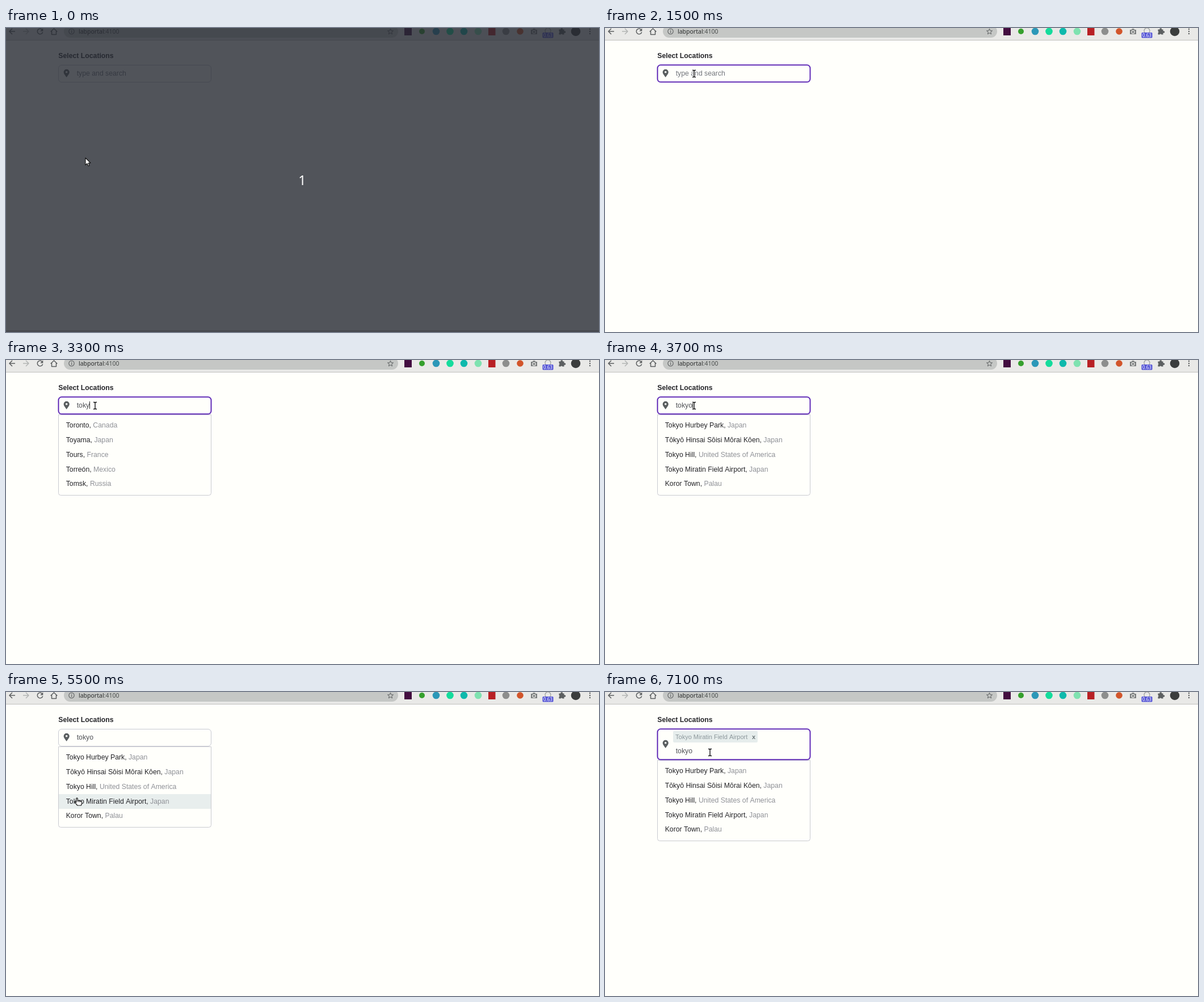
Write an HTML page with a canvas that moves like this. It is 1045 by 536 pixels and loops after 8 s.

```html
<!DOCTYPE html>
<html lang="en">
<head>
<meta charset="utf-8">
<title>Location picker</title>
<style>
html, body { margin: 0; width: 100%; height: 100%; overflow: hidden; background: #fffffb; }
canvas { display: block; width: 1045px; height: 536px; }
</style>
</head>
<body>
<canvas id="stage" width="1045" height="536"></canvas>
<script>
const ctx = document.getElementById('stage').getContext('2d');
const LOOP = 8000;
const HOVER_LEAD = 115;
const PAGE = '#fffffb';
const ICON = '#5c5f60';
const SANS = '"Liberation Sans", Arial, sans-serif';
const UI = '"Noto Sans", "Open Sans", sans-serif';
const BODY = '12.25px ' + SANS;
const ROW = 25.8;

const park = ['Tokyo Hurbey Park', 'Japan'];
const garden = ['Tōkyō Hinsai Sōisi Mōrai Kōen', 'Japan'];
const hill = ['Tokyo Hill', 'United States of America'];
const airport = ['Tokyo Miratin Field Airport', 'Japan'];
const town = ['Koror Town', 'Palau'];

// Each entry holds from its start time until the next one.
const typing = [[0, ''], [2400, 't'], [2500, 'to'], [2700, 'tok'], [3300, 'toky'], [3500, 'tokyo']];
const results = [
  [0, null],
  [2400, [['Tianjin', 'China'], ['Alicante', 'Spain'], ['Tekirdağ', 'Turkey'], ['Rabat', 'Morocco'], ['Shenyang', 'China']]],
  [2700, [['Toronto', 'Canada'], ['Toyama', 'Japan'], ['Tours', 'France'], ['Torreón', 'Mexico'], ['Tomsk', 'Russia']]],
  [3400, [hill, park, garden, airport, town]],
  [3700, [park, garden, hill, airport, town]]
];
const carets = [[0, false], [1000, true], [1500, false], [2100, true], [4200, false], [4900, true], [5400, false]];

// Pointer moves: start, end, from, to.
const moves = [
  [600, 1200, [140, 229], [157, 80.5]],
  [5100, 5500, [155, 78], [125, 187]],
  [5600, 5700, [125, 187], [119, 186]],
  [6500, 7100, [119, 186], [185, 106.5]]
];

const at = (track, t) => track.filter(([start]) => start <= t).pop()[1];
const smooth = p => p * p * (3 - 2 * p);

function pointer(t) {
  const [start, end, a, b] = moves.filter(m => m[0] <= t).pop() || moves[0];
  const p = smooth(Math.max(0, Math.min(1, (t - start) / (end - start))));
  return a.map((v, i) => v + (b[i] - v) * p);
}

function text(s, x, y, font, color, align = 'left') {
  ctx.font = font;
  ctx.fillStyle = color;
  ctx.textAlign = align;
  ctx.fillText(s, x, y);
  return ctx.measureText(s).width;
}

function box(x, y, w, h, r, fill, stroke, width = 1) {
  ctx.beginPath();
  ctx.roundRect(x, y, w, h, r);
  paint(fill, stroke, width);
}

function circle(x, y, r, fill, stroke, width = 1) {
  ctx.beginPath();
  ctx.arc(x, y, r, 0, Math.PI * 2);
  paint(fill, stroke, width);
}

function shape(d, x, y, fill, stroke, width = 1) {
  ctx.save();
  ctx.translate(x, y);
  const path = new Path2D(d);
  ctx.lineJoin = 'round';
  if (fill) { ctx.fillStyle = fill; ctx.fill(path, 'evenodd'); }
  if (stroke) { ctx.strokeStyle = stroke; ctx.lineWidth = width; ctx.stroke(path); }
  ctx.restore();
}

function paint(fill, stroke, width) {
  if (fill) { ctx.fillStyle = fill; ctx.fill(); }
  if (stroke) { ctx.strokeStyle = stroke; ctx.lineWidth = width; ctx.stroke(); }
}

function drawToolbar() {
  ctx.fillStyle = '#e9e9e7';
  ctx.fillRect(0, 0, 1045, 21);
  ctx.fillStyle = '#bfc0be';
  ctx.fillRect(0, 21, 1045, 1);
  box(102, -5, 589, 22, 11, '#c5c7c5');

  shape('M5 0H-4.5M0 -5L-5 0L0 5', 11, 6, null, ICON, 1.5);
  shape('M-5 0H4.5M0 -5L5 0L0 5', 35, 6, null, '#b3b5b4', 1.5);
  shape('M4.2 -2.4A4.8 4.8 0 1 0 4.7 1.2', 60, 6, null, ICON, 1.5);
  shape('M5.3 -5.5V-.5H.3Z', 60, 6, ICON);
  shape('M-5.8 .5L0 -5L5.8 .5M-4 -1V5.5H4V-1', 84.5, 6, null, ICON, 1.5);
  circle(115.5, 6, 4.7, null, ICON, 1.1);
  ctx.fillStyle = ICON;
  ctx.fillRect(115, 5.3, 1.2, 3.4);
  ctx.fillRect(115, 3.2, 1.2, 1.2);
  const w = text('labportal', 128, 10, '10.5px ' + UI, '#2b2d2d');
  text(':4100', 128 + w, 10, '10.5px ' + UI, '#4c504f');
  shape('M0 -5L1.4 -1.6L5 -1.4L2.2 .9L3.1 4.5L0 2.5L-3.1 4.5L-2.2 .9L-5 -1.4L-1.4 -1.6Z', 677.5, 6.3, null, ICON);

  box(702, 0, 13, 13, 0, '#430d40');
  circle(733, 6, 5, '#35a02c');
  circle(758, 6, 6.3, '#2c98b8');
  circle(782.5, 6, 6.3, '#14dc9c');
  circle(807, 6, 6.3, '#0eb9ac');
  circle(832, 6, 6.3, '#7fe2b0');
  box(850, 0, 12.5, 13, 0, '#b82024');
  circle(881, 6, 6.3, '#8d8e8d');
  circle(906, 6, 5.8, '#d2552a');

  shape('M-5.5 -3H-2.7L-1.6 -4.7H1.6L2.7 -3H5.5V5H-5.5Z', 930.5, 6, '#7b7e7e');
  circle(930.5, 7, 2.6, '#7b7e7e', '#e9e9e7', 1.2);
  circle(955, 5, 5, null, '#9a9c9b', 1.2);
  box(945.5, 8, 19, 9.5, 1.5, '#5454d6');
  text('0.63', 955, 15.7, '8px ' + UI, '#fff', 'center');
  shape('M-5 -3H-2A1.8 1.8 0 1 1 1.5 -3H4V0A1.8 1.8 0 1 1 4 3V6H1A1.7 1.7 0 0 0 -2 6H-5V3A1.7 1.7 0 0 0 -5 0Z', 979.5, 5.5, ICON);
  circle(1004, 6, 8.3, '#3b3d3d');
  for (const y of [2, 6, 10]) circle(1029, y, 1.2, ICON);
}

function drawResults(rows, top, active) {
  box(92.5, top + .5, 269, 142, [0, 0, 4, 4], PAGE, '#c9cad0');
  rows.forEach(([place, country], i) => {
    const y = top + 6.3 + i * ROW;
    if (i === active) {
      ctx.fillStyle = '#e8eeed';
      ctx.fillRect(93, Math.round(y), 268, 26);
    }
    const w = text(place + ', ', 105.7, y + 16.8, BODY, '#242428');
    text(country, 105.7 + w, y + 16.8, BODY, '#8f9197');
  });
}

function drawInput(typed, height, tagged, hovered, caret) {
  const mid = 65 + height / 2;
  const baseline = tagged ? 108 : 84;
  if (hovered) {
    box(92.5, 65.3, 269, height, 5.5, PAGE, 'rgba(110, 70, 210, .3)', 3);
    box(92.5, 65.3, 269, height, 5.5, null, '#571cae', 1.5);
  } else {
    box(92.5, 65.5, 269, height, 5.5, PAGE, '#c8cad3');
  }

  shape('M0 7.2C-1.5 4.8 -5.1 1.1 -5.1 -2A5.1 5.1 0 0 1 5.1 -2C5.1 1.1 1.5 4.8 0 7.2ZM1.8 -2A1.8 1.8 0 1 0 -1.8 -2A1.8 1.8 0 1 0 1.8 -2Z', 106.7, mid - .2, '#5a5e60');

  if (tagged) {
    box(120, 68.5, 149, 20.5, 2.5, '#e6edec');
    text(airport[0], 124, 82.6, '11.03px ' + SANS, '#8c979b');
    text('x', 262, 82.6, 'bold 11.03px ' + SANS, '#6d7779', 'center');
  }
  const w = text(typed || 'type and search', 124.7, baseline, BODY, typed ? '#505257' : '#73767d');
  if (caret) {
    ctx.fillStyle = '#222';
    ctx.fillRect(Math.floor(125 + (typed ? w : 0)), typed ? 73 : 74, 1, 13);
  }
}

function drawArrow(x, y) {
  shape('M0 0V12.5L3 9.8L5 14.3L7 13.4L5.1 9H9Z', x, y, '#fff', '#111', 1.1);
}

function drawBeam(x, y) {
  const d = 'M-3 -6H-1L0 -5L1 -6H3M0 -5V5M-3 6H-1L0 5L1 6H3';
  shape(d, x, y, null, '#fff', 3);
  shape(d, x, y, null, '#111', 1.4);
}

function drawHand(x, y) {
  shape('M-1.2 7.5V.8Q0 -1 1.3 .8V4.6Q2.6 3.6 3.6 5Q5 4.1 6 5.6Q8.3 5 8.6 7V10L7.3 13H.8L-3.3 8.2Q-3 6 -1.2 7.5Z', x, y, '#fff', '#111', 1.2);
  shape('M1.3 4.6V7M3.6 5V7.3M6 5.6V7.5', x, y, null, '#111', .8);
}

function drawCountdown() {
  ctx.fillStyle = 'rgba(38, 42, 50, .8)';
  ctx.fillRect(0, 0, 1045, 536);
  ctx.fillStyle = 'rgba(40, 40, 46, .25)';
  ctx.fillRect(0, 533, 1045, 3);
  text('1', 522, 277, '23.5px ' + UI, '#fff', 'center');
}

function draw(now) {
  const t = Math.floor(now % LOOP / 100) * 100;
  const typed = at(typing, t);
  const rows = at(results, t);
  const tagged = t >= 6500;
  const height = tagged ? 54 : 30;
  const top = 66 + height;
  const [x, y] = pointer(t);
  // Once results are open, hover styling runs slightly ahead of the pointer.
  const hoverY = pointer(rows ? t + HOVER_LEAD : t)[1];
  const hovered = hoverY < top;
  const active = hovered ? -1 : Math.max(0, Math.floor((hoverY - top - 6.3) / ROW));

  ctx.fillStyle = PAGE;
  ctx.fillRect(0, 0, 1045, 536);
  drawToolbar();
  text('Select Locations', 92.3, 53, 'bold ' + BODY, '#242428');
  if (rows) drawResults(rows, top, active);
  drawInput(typed, height, tagged, hovered, at(carets, t));
  if (t < 500) drawCountdown();

  if (hovered) drawBeam(x, y);
  else if (rows) drawHand(x, y);
  else drawArrow(x, y);
}

function tick() {
  draw(performance.now());
  requestAnimationFrame(tick);
}
tick();
</script>
</body>
</html>
```
